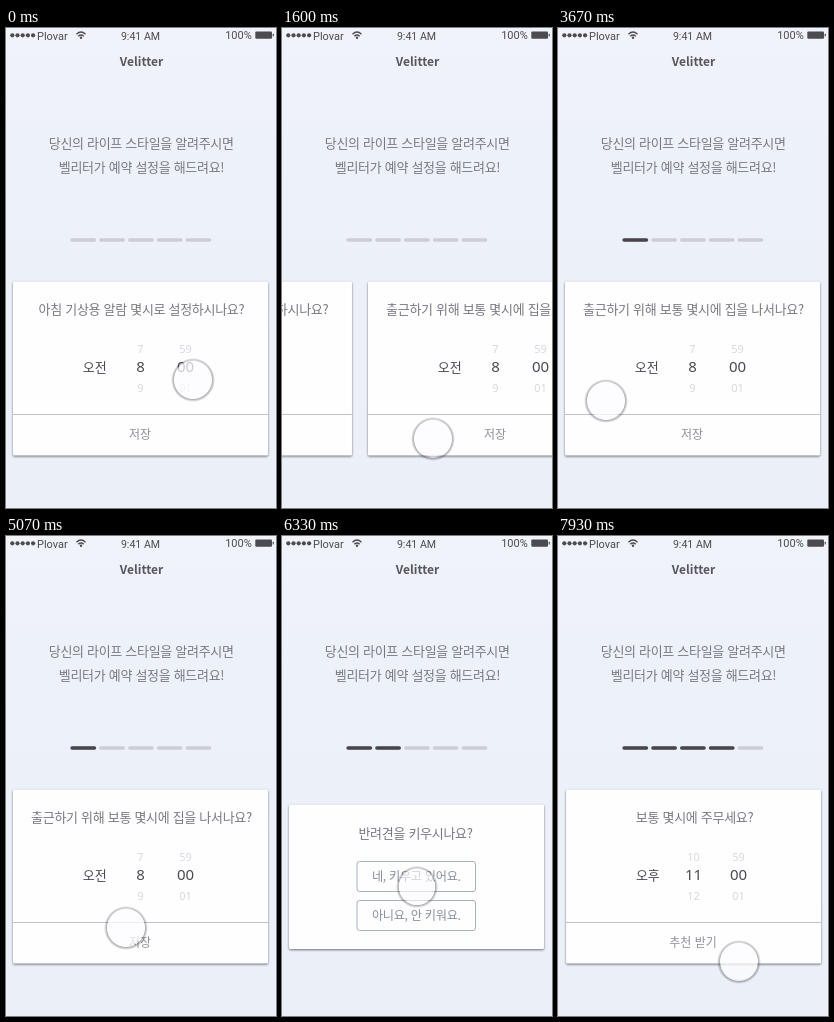
Write an HTML page that moves like this. It is 270 px wide and 480 px high and loops after 8000 ms.

```html
<!DOCTYPE html>
<html lang="ko">
<head>
<meta charset="utf-8">
<title>Velitter</title>
<style>
  html, body { margin: 0; width: 100%; height: 100%; overflow: hidden; background: #edf1f9; }
  svg { display: block; width: 100vw; height: 100vh; }
  text { font: 300 13px "Noto Sans CJK KR", "Noto Sans CJK", sans-serif; letter-spacing: -.3px; text-anchor: middle; fill: #787980; }
  .status text { font: 400 11px Roboto, sans-serif; letter-spacing: 0; fill: #4b4b50; }
  .status .left { text-anchor: start; }
  .status .clock { font-size: 10.6px; }
  .brand { font-size: 12px; font-weight: 700; letter-spacing: 0; fill: #56565c; }
  .paper { fill: #fefeff; filter: drop-shadow(0 1.2px 1.2px rgba(40, 40, 46, .65)); }
  .rule { stroke: #c0c2c8; stroke-width: 1.2; }
  .action { font-size: 12px; letter-spacing: 0; fill: #909198; }
  .option { fill: #fefeff; stroke: #a9b0be; }
  .choice { font-size: 12.2px; fill: #888e9c; }
  .now { letter-spacing: -.1px; fill: #4a4a50; }
  .digit { font: 400 15px "Noto Sans", sans-serif; letter-spacing: 0; fill: #4a4a50; }
  .ghost { font: 400 11px "Noto Sans", sans-serif; letter-spacing: 0; fill: #d6d8dd; }
</style>
</head>
<body>
<svg viewBox="0 0 270 480" preserveAspectRatio="none">
  <defs>
    <linearGradient id="sky" x2="0" y2="1">
      <stop stop-color="#f0f3fa"/><stop offset=".25" stop-color="#edf1f9"/><stop offset="1" stop-color="#ebeff8"/>
    </linearGradient>
    <radialGradient id="halo">
      <stop offset=".84" stop-color="#28282e" stop-opacity="0"/>
      <stop offset=".88" stop-color="#28282e" stop-opacity=".36"/>
      <stop offset="1" stop-color="#28282e" stop-opacity="0"/>
    </radialGradient>
  </defs>
  <rect width="270" height="480" fill="url(#sky)"/>
  <g class="status" fill="#4b4b50">
    <g id="signal"></g>
    <text class="left" x="31" y="11.5">Plovar</text>
    <path d="M70.5 6.2Q75 2 79.5 6.2M72.3 8.2Q75 5.8 77.7 8.2" fill="none" stroke="#4b4b50" stroke-width="1.4"/>
    <circle cx="75" cy="9.8" r="1.2"/>
    <text class="clock" x="134.5" y="11.5">9:41 AM</text>
    <text x="232.5" y="11">100%</text>
    <rect x="249.3" y="3.4" width="16.7" height="7.4" rx="1"/>
    <rect x="266.7" y="5.8" width="1.1" height="2.6" rx=".5"/>
  </g>
  <text class="brand" x="135.5" y="38">Velitter</text>
  <text x="135.2" y="120">당신의 라이프 스타일을 알려주시면</text>
  <text x="135.5" y="144">벨리터가 예약 설정을 해드려요!</text>
  <g id="bars"></g>
  <g id="cards"></g>
  <g id="touch">
    <circle cy="1" r="22" fill="url(#halo)"/>
    <circle id="disc" r="18.7" fill="#fefeff"/>
  </g>
</svg>
<script>
const LOOP = 8000, STEP = 1000 / 15, PITCH = 271, SLIDE = 530, TRAVEL = 350, PRESS = 130;
const slides = [1378, 5308, 6448, 7448];

// Rest points of the touch: arrival time, x, y
const stops = [
  [0, 187, 351], [667, 131, 351], [1200, 151, 410], [2467, 206, 399], [2933, 243, 385],
  [3667, 48, 372], [4133, 122, 370], [4533, 167, 337], [4867, 34, 368], [5067, 120, 391],
  [6333, 135, 350], [7333, 161, 380], [7933, 181, 425]
];

const $ = id => document.getElementById(id);
const clamp = v => Math.min(1, Math.max(0, v));
const smooth = p => p * p * (3 - 2 * p);
const text = (cls, x, y, s) => `<text class="${cls}" x="${x}" y="${y}">${s}</text>`;
const paper = (y, h) => `<rect class="paper" x="7" y="${y}" width="255" height="${h}" rx="1.5"/>`;

function timeCard(title, half, hour, action) {
  const wheel = (x, above, now, below) =>
    text('ghost', x, 325, above) + text('digit', x, 344, now) + text('ghost', x, 364, below);
  return paper(253.5, 174) + text('', 135.5, 286, title) + text('now', 88.7, 343.5, half) +
    wheel(134.5, hour - 1, hour, hour + 1) + wheel(179.5, '59', '00', '01') +
    '<path class="rule" d="M7 386.5H262"/>' + text('action', 134, 411, action);
}

function choiceCard(title, options) {
  return paper(268.5, 144.5) + text('', 133.5, 301.5, title) + options.map((label, i) =>
    `<rect class="option" x="75" y="${325.5 + 39 * i}" width="118.5" height="30" rx="2.5"/>` +
    text('choice', 134.3, 345.3 + 39 * i, label)).join('');
}

$('cards').innerHTML = [
  timeCard('아침 기상용 알람 몇시로 설정하시나요?', '오전', 8, '저장'),
  timeCard('출근하기 위해 보통 몇시에 집을 나서나요?', '오전', 8, '저장'),
  choiceCard('반려견을 키우시나요?', ['네, 키우고 있어요.', '아니요, 안 키워요.']),
  choiceCard('혼자 살아서 도둑이 걱정되시나요?', ['네, 걱정되요.', '아니요']),
  timeCard('보통 몇시에 주무세요?', '오후', 11, '추천 받기')
].map(card => `<g>${card}</g>`).join('');

for (let i = 0; i < 5; i++) {
  const bar = fill => `<rect x="${64.4 + 28.8 * i}" y="210.2" width="25.8" height="3.6" rx="1.8" fill="${fill}"/>`;
  $('signal').innerHTML += `<circle cx="${6.3 + 5.2 * i}" cy="7.3" r="2.1"/>`;
  $('bars').innerHTML += bar('#cccdd5') + `<g opacity="0">${bar('#48464b')}</g>`;
}
const filled = [...$('bars').querySelectorAll('g')];
const cards = [...$('cards').children];

// cubic-bezier(.25, .1, .25, 1)
function ease(p) {
  if (p <= 0 || p >= 1) return clamp(p);
  const curve = (u, a, b) => 3 * a * u * (1 - u) ** 2 + 3 * b * u * u * (1 - u) + u ** 3;
  let low = 0, high = 1;
  for (let i = 0; i < 20; i++) {
    const mid = (low + high) / 2;
    if (curve(mid, .25, .25) < p) low = mid; else high = mid;
  }
  return curve(low, .1, 1);
}

// Rests at each stop, then glides so as to reach the next one on time
function touchAt(t) {
  let [last, x, y] = stops[0];
  for (const [time, nextX, nextY] of stops.slice(1)) {
    const span = Math.min(TRAVEL, time - last);
    const p = smooth(clamp((t - time + span) / span));
    x += (nextX - x) * p;
    y += (nextY - y) * p;
    last = time;
  }
  return [x, y];
}

function draw(now) {
  const t = Math.floor(((now + 5) % LOOP) / STEP) * STEP;
  const position = slides.reduce((sum, start) => sum + ease((t - start) / SLIDE), 0);
  cards.forEach((card, i) => {
    const x = PITCH * (i - position);
    card.setAttribute('transform', `translate(${x.toFixed(2)})`);
    card.setAttribute('visibility', Math.abs(x) < PITCH ? 'visible' : 'hidden');
  });
  slides.forEach((start, i) => filled[i].setAttribute('opacity', clamp((t - start - 250) / 150)));

  const [x, y] = touchAt(t);
  const pressed = slides.some(start => t >= start - PRESS && t < start);
  $('touch').setAttribute('transform', `translate(${x} ${y}) scale(${pressed ? .96 : 1})`);
  $('disc').setAttribute('fill-opacity', pressed ? .62 : .72);
}

function tick(now) {
  draw(now);
  requestAnimationFrame(tick);
}
draw(0);
requestAnimationFrame(tick);
</script>
</body>
</html>
```
